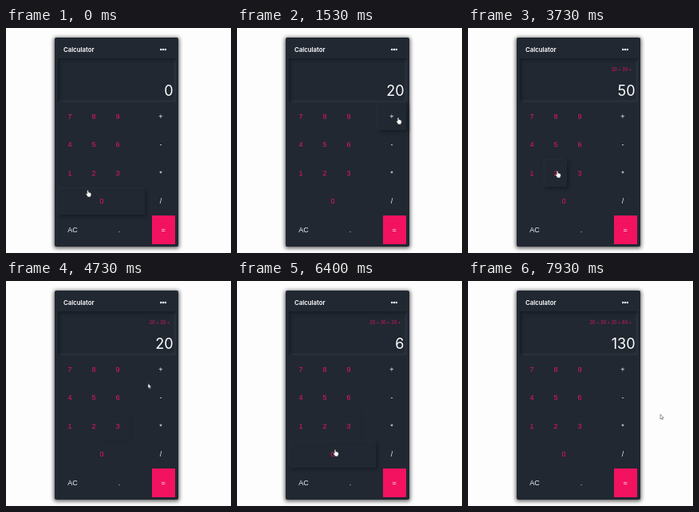
An HTML page that plays this animation: 282x282 px, repeating every 8 s.

```html
<!DOCTYPE html>
<html lang="en">
<head>
<meta charset="utf-8">
<title>Calculator</title>
<style>
  html, body { margin: 0; width: 100%; height: 100%; overflow: hidden; background: #fdfdfd; }
  #stage { position: relative; width: 282px; height: 282px; overflow: hidden; }
  #stage > * { position: absolute; box-sizing: border-box; }
  .card {
    left: 61px; top: 12px; width: 155px; height: 261.5px; border-radius: 2px;
    background: #212832; box-shadow: 0 1px 5px 1px rgba(0, 0, 0, .65);
  }
  .screen {
    left: 65px; top: 38px; width: 148px; height: 55px; border-radius: 1px;
    box-shadow: inset 2px 2px 4px #171c24, inset -2px -2px 3px #303844;
  }
  .key {
    display: flex; align-items: center; justify-content: center;
    font: 9px "Liberation Sans", Arial, sans-serif; color: #f4f4f6;
  }
  .key::before {
    content: ""; position: absolute; inset: 1px; border-radius: 1px; opacity: var(--hover, 0);
    box-shadow: 2px 2px 4px #161b23, -1px -1px 3px #2b333f;
  }
  .digit { color: #ec145f; }
  .equals { background: #f31260; }
  svg { left: 0; top: 0; }
  svg text { font-family: Inter, "Open Sans", sans-serif; }
</style>
</head>
<body>
<div id="stage">
  <div class="card"></div>
  <div class="screen"></div>
  <svg width="282" height="282" viewBox="0 0 282 282" style="z-index:1">
    <text x="72" y="29.6" font-size="7.8" font-weight="600" fill="#fff">Calculator</text>
    <g fill="#fff">
      <circle cx="194.2" cy="27" r="1.2"/><circle cx="197" cy="27" r="1.2"/><circle cx="199.8" cy="27" r="1.2"/>
    </g>
    <text id="history" x="205.3" y="54.4" font-size="5.5" fill="#e0145c" text-anchor="end"></text>
    <text id="value" x="209.5" y="84.8" font-size="18" fill="#fff" text-anchor="end"></text>
    <path id="arrow" d="M0 0V6L1.4 4.8L2.3 6.8L3.3 6.3L2.4 4.4H4.2Z" fill="#fff" stroke="#333" stroke-width=".5"/>
    <path id="hand" d="M-.8 .7Q0 -.4 .8 .7V3Q1.8 2.6 2.1 3.3Q3 3 3.2 3.7Q4.2 3.6 4.2 4.6V6.2Q4 7.2 3.5 7.7V8.8H-.3V8L-2.3 5.2Q-2.2 4.1 -.8 5Z" fill="#fff" stroke="#222" stroke-width=".4"/>
  </svg>
</div>
<script>
const LOOP = 8000, STEP = 200 / 3, ROW = 35.5;
const $ = id => document.getElementById(id);
const stage = $("stage");
const keys = [];

function addKey(label, x, row, w, type = "") {
  const el = document.createElement("div");
  const y = 93 + row * ROW;
  el.className = "key " + type;
  el.textContent = label;
  Object.assign(el.style, { left: x + "px", top: y + "px", width: w + "px", height: ROW + "px" });
  stage.append(el);
  keys.push({ el, x, y, w });
}

["789", "456", "123"].forEach((digits, row) =>
  [...digits].forEach((d, col) => addKey(d, 65 + col * 30, row, 30, "digit")));
addKey("0", 65, 3, 110, "digit");
[..."+-*/"].forEach((op, row) => addKey(op, 175, row, 38));
addKey("AC", 65, 4, 37);
addKey(".", 102, 4, 80);
addKey("=", 183, 4, 28.5, "equals");

// Pointer waypoints: time, x, y
const path = [
  [0, 102.5, 203], [330, 110, 179], [470, 110, 179], [730, 118, 211], [930, 118, 211],
  [1470, 202, 112], [1680, 202, 112], [2000, 141, 179], [2150, 141, 179],
  [2350, 124, 211], [2500, 124, 211], [2733, 180, 155], [2950, 197, 111], [3130, 197, 111],
  [3650, 112, 179], [3850, 112, 179], [4100, 121, 211], [4350, 121, 211],
  [4733, 178, 128.5], [4950, 197, 111], [5150, 197, 111], [5733, 139.5, 170],
  [5930, 140, 145], [6070, 140, 145], [6350, 123, 211], [6520, 123, 211],
  [7000, 196.5, 111.5], [7200, 196.5, 111.5], [7400, 215, 60], [7760, 241, 167], [8000, 241, 167]
];

// Key presses: time, key
const presses = [
  [400, "2"], [850, "0"], [1620, "+"], [2080, "3"], [2430, "0"], [3050, "+"],
  [3750, "2"], [4230, "0"], [5050, "+"], [6000, "6"], [6440, "0"], [7130, "+"]
];

const slope = (i, k) => (path[i + 1][k] - path[i][k]) / (path[i + 1][0] - path[i][0]);

// Smooth through passing points, at rest on turning points.
function tangent(i, k) {
  if (i === 0 || i === path.length - 1) return 0;
  const a = slope(i - 1, k), b = slope(i, k);
  return a * b > 0 ? 2 * a * b / (a + b) : 0;
}

function pointer(t) {
  t = Math.max(0, t);
  let i = 0;
  while (i < path.length - 2 && path[i + 1][0] <= t) i++;
  const h = path[i + 1][0] - path[i][0], u = (t - path[i][0]) / h, v = 1 - u;
  return [1, 2].map(k =>
    v * v * (1 + 2 * u) * path[i][k] + u * u * (3 - 2 * u) * path[i + 1][k] +
    h * u * v * (v * tangent(i, k) - u * tangent(i + 1, k)));
}

const over = (key, [x, y]) =>
  x > key.x + 1 && x < key.x + key.w - 1 && y > key.y + 1 && y < key.y + ROW - 1;

function calculate(t) {
  let sum = 0, entry = "", history = "";
  for (const [at, key] of presses) {
    if (at > t) break;
    if (key === "+") {
      sum += +entry;
      history += entry + " + ";
      entry = "";
    } else entry += key;
  }
  return { value: entry || sum, history: history.trim() };
}

function render(ms) {
  const t = Math.floor((ms % LOOP + 7) / STEP) * STEP % LOOP;
  const { value, history } = calculate(t);
  $("value").textContent = value;
  $("history").textContent = history;

  const trail = [0, 40, 80, 120, 160].map(lag => pointer(t - lag));
  for (const key of keys)
    key.el.style.setProperty("--hover", trail.filter(p => over(key, p)).length / trail.length);

  const onKey = keys.some(key => over(key, trail[0]));
  for (const id of ["hand", "arrow"]) {
    $(id).setAttribute("transform", `translate(${trail[0]})`);
    $(id).style.display = onKey === (id === "hand") ? "" : "none";
  }
}

const start = performance.now();
function tick() {
  render(performance.now() - start);
  requestAnimationFrame(tick);
}
tick();
</script>
</body>
</html>
```
